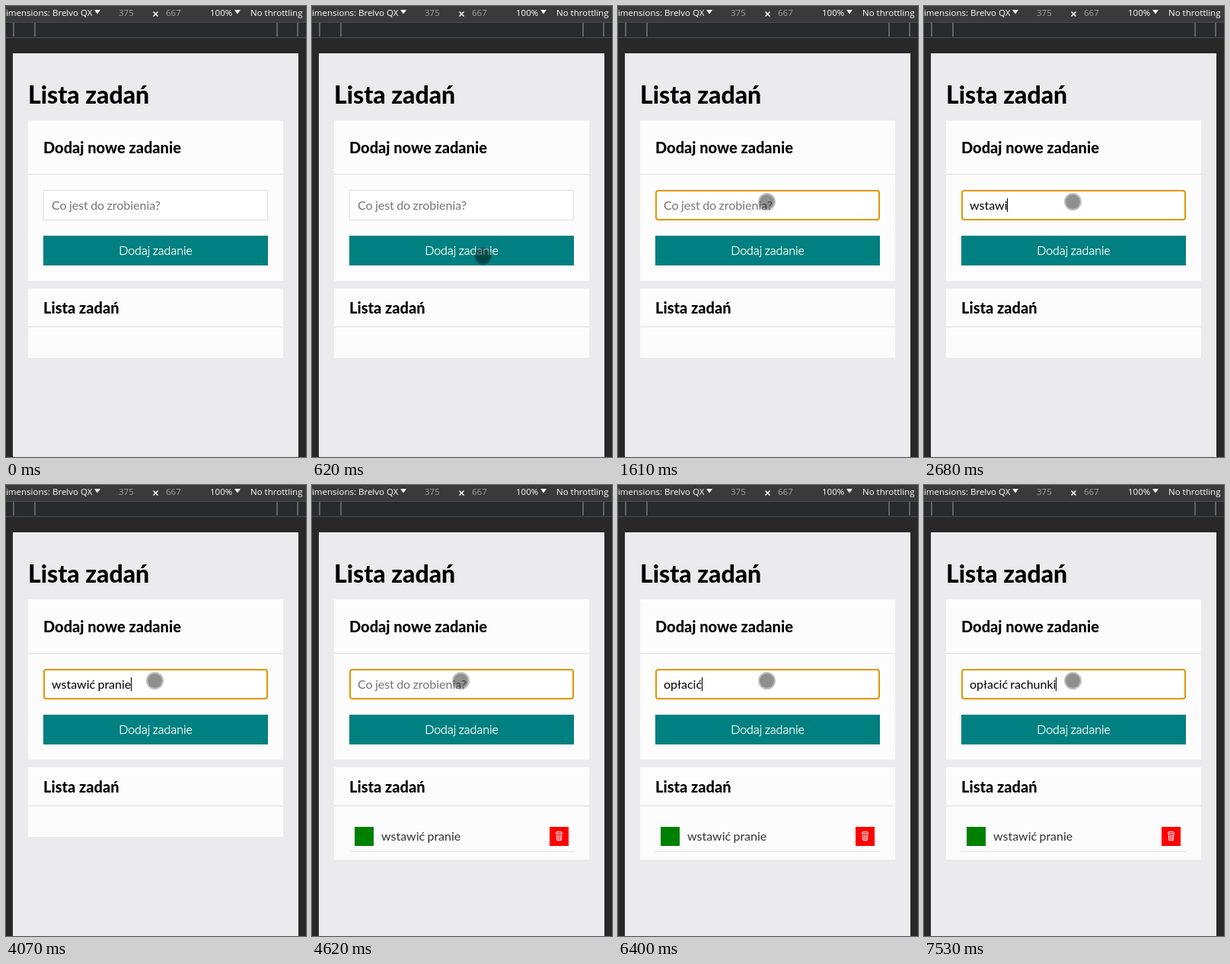
Animation of 394 by 591 pixels, one loop 8 s. Source, as an HTML page with a canvas:

```html
<!DOCTYPE html>
<html lang="pl">
<head>
<meta charset="utf-8">
<title>Lista zadań</title>
<style>
  html, body { margin: 0; width: 100%; height: 100%; overflow: hidden; background: #282828; }
  canvas { display: block; width: 394px; height: 591px; }
</style>
</head>
<body>
<canvas id="stage"></canvas>
<script>
const W = 394, H = 591, LOOP = 8000;
const canvas = document.getElementById('stage');
const ctx = canvas.getContext('2d');
const ratio = window.devicePixelRatio || 1;
canvas.width = W * ratio;
canvas.height = H * ratio;

const LATO = 'Lato, sans-serif';
const UI = '11.5px "Open Sans", sans-serif';
const BODY = '16px ' + LATO;
const H1 = '800 32px ' + LATO;
const H2 = '800 20px ' + LATO;
const LINE = '#dddddd';

// Times in ms
const FOCUS = 1160, SUBMIT = 4620;
const caretOff = [[1610, 2020], [4620, 5080]];
const moves = [370, 430, 500, 560, 620, 690, 760, 820, 950];
const tasks = [
  { text: 'wstawić pranie', from: 2020, until: SUBMIT,
    keys: [2020, 2220, 2350, 2480, 2610, 2680, 3010, 3150, 3210, 3340, 3410, 3940, 4000, 4070] },
  { text: 'opłacić rachunki', from: 5340, until: LOOP,
    keys: [5340, 5540, 5800, 5870, 6000, 6070, 6400, 6530, 6600, 6730, 6930, 7060, 7130, 7330, 7400, 7530] }
];

const passed = (times, t) => times.filter(k => k <= t).length;

function rect(x, y, w, h, color) {
  ctx.fillStyle = color;
  ctx.fillRect(x, y, w, h);
}

function label(text, x, y, font, color, align = 'left') {
  ctx.font = font;
  ctx.fillStyle = color;
  ctx.textAlign = align;
  ctx.fillText(text, x, y);
}

function disc(x, y, r, color) {
  ctx.fillStyle = color;
  ctx.beginPath();
  ctx.arc(x, y, r, 0, Math.PI * 2);
  ctx.fill();
}

function arrow(x, y) {
  ctx.fillStyle = '#fff';
  ctx.beginPath();
  ctx.moveTo(x - 4, y);
  ctx.lineTo(x + 4, y);
  ctx.lineTo(x, y + 5.5);
  ctx.fill();
}

function toolbar() {
  rect(0, 0, W, H, '#282828');
  rect(0, 0, W, 21, '#3a3a3b');
  rect(0, 21, W, 20, '#292a2d');
  rect(0, 21, W, 1, '#4a4b4e');
  rect(0, 41, W, 1, '#4a4b4e');
  for (const x of [9, 37, 355, 382]) rect(x, 22, 2, 18, '#606266');
  label('Dimensions:', 58, 13, UI, '#fff', 'right');
  label('Brelvo QX', 61, 13, UI, '#fff');
  arrow(120, 5);
  label('375', 148, 13, UI, '#a0a2a5');
  label('667', 210, 13, UI, '#a0a2a5');
  label('100%', 268, 13, UI, '#fff');
  arrow(304, 5);
  label('No throttling', 321, 13, UI, '#fff');
  ctx.strokeStyle = '#fff';
  ctx.lineWidth = 1.5;
  ctx.beginPath();
  ctx.moveTo(193.5, 7.5); ctx.lineTo(199.5, 13.5);
  ctx.moveTo(199.5, 7.5); ctx.lineTo(193.5, 13.5);
  ctx.stroke();
}

function card(y, bottom, title, headHeight, baseline) {
  rect(29, y, 335, bottom - y, '#fcfcfc');
  rect(29, y + headHeight, 335, 1, LINE);
  label(title, 49, baseline, H2, '#000');
}

function field(t) {
  const focused = t >= FOCUS;
  rect(49, 241, 295, 40, focused ? '#fcfcfc' : LINE);
  rect(50, 242, 293, 38, '#fff');
  if (focused) {
    ctx.strokeStyle = '#e29700';
    ctx.lineWidth = 2;
    ctx.beginPath();
    ctx.roundRect(50, 242, 293, 38, 3);
    ctx.stroke();
  }

  const task = tasks.find(k => t >= k.from && t < k.until);
  const typed = task ? task.text.slice(0, passed(task.keys, t)) : '';
  if (typed) label(typed, 60, 267, BODY, '#000');
  else label('Co jest do zrobienia?', 60, 267, BODY, '#757575');

  if (focused && !caretOff.some(([a, b]) => t >= a && t < b)) {
    ctx.font = BODY;
    rect(60 + Math.floor(ctx.measureText(typed).width), 252, 1, 18, '#000');
  }
}

function button() {
  const text = 'Dodaj zadanie';
  rect(49, 301, 295, 39, '#008080');
  label(text, 196.5, 326, '300 ' + BODY, '#fff', 'center');
  // A hairline outline keeps the thin letters bright
  ctx.strokeStyle = '#fff';
  ctx.lineWidth = 0.35;
  ctx.strokeText(text, 196.5, 326);
}

function bin(x, y) {
  ctx.strokeStyle = '#fff';
  ctx.lineWidth = 1;
  ctx.beginPath();
  ctx.ellipse(x, y - 4.5, 4, 1.2, 0, 0, Math.PI * 2);
  ctx.moveTo(x - 3.5, y - 4);
  ctx.lineTo(x - 2.7, y + 5.5);
  ctx.lineTo(x + 2.7, y + 5.5);
  ctx.lineTo(x + 3.5, y - 4);
  ctx.moveTo(x - 1, y - 2);
  ctx.lineTo(x - 1, y + 4.5);
  ctx.moveTo(x + 1.2, y - 2);
  ctx.lineTo(x + 1.2, y + 4.5);
  ctx.stroke();
}

function item() {
  rect(56, 448, 25, 25, '#008000');
  label(tasks[0].text, 91, 466, BODY, '#333');
  rect(312, 448, 25, 25, '#ff0000');
  bin(324.5, 460);
  rect(49, 480, 295, 1, LINE);
}

// The pointer glides in at stepped times, slowing down
function pointer(t) {
  const n = passed(moves, t);
  if (!n) return;
  const rest = 1 - (moves[n - 1] - 370) / 580;
  const x = 195.5 + 104.5 * Math.pow(rest, 2.27);
  const y = 256.5 + 308.5 * Math.pow(rest, 2.6);
  ctx.strokeStyle = 'rgba(0,0,0,.25)';
  ctx.lineWidth = 2;
  ctx.beginPath();
  ctx.arc(x, y, 10.5, 0, Math.PI * 2);
  ctx.stroke();
  disc(x, y, 9.5, 'rgba(0,0,0,.44)');
}

function draw(t) {
  const added = t >= SUBMIT;
  ctx.setTransform(ratio, 0, 0, ratio, 0, 0);
  ctx.wordSpacing = '0px';
  toolbar();
  rect(9, 62, 375, 529, '#ebebed');
  label('Lista zadań', 29, 128, H1, '#000');
  card(150, 360, 'Dodaj nowe zadanie', 70, 193);
  card(370, added ? 491 : 461, 'Lista zadań', 50, 403);
  ctx.wordSpacing = '-0.8px';
  field(t);
  button();
  if (added) item();
  pointer(t);
}

const start = performance.now();
function tick() {
  draw((performance.now() - start) % LOOP);
  requestAnimationFrame(tick);
}
tick();
</script>
</body>
</html>
```
